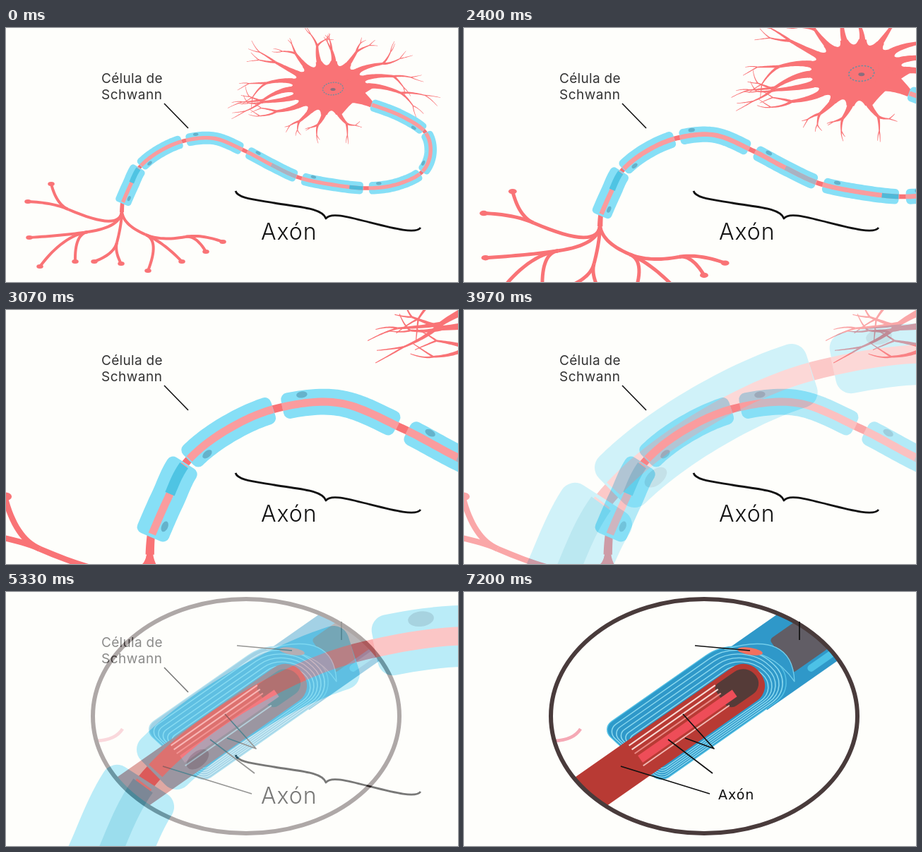
Recreate the animation shown at these times as an HTML page with a canvas. Size 640 by 360 pixels, loop 8 s.

```html
<!DOCTYPE html>
<html lang="es">
<head>
<meta charset="utf-8">
<style>
html, body { margin: 0; width: 100%; height: 100%; overflow: hidden; background: #fefefb; }
canvas { position: absolute; left: 0; top: 0; }
</style>
</head>
<body>
<script>
const PAPER = '#fefefb', RED = '#f97376', CYAN = '#86dff6', BLUE = '#2f98c9', INK = '#111';
const TAU = Math.PI * 2;
let g, seed;

function random() {
  seed = (seed * 16807) % 2147483647;
  return seed / 2147483647;
}

function layer(draw, opaque) {
  const canvas = document.body.appendChild(document.createElement('canvas'));
  canvas.width = 640;
  canvas.height = 360;
  g = canvas.getContext('2d');
  g.lineJoin = 'round';
  if (opaque) {
    g.fillStyle = PAPER;
    g.fillRect(0, 0, 640, 360);
  }
  draw();
  return canvas;
}

function stroke(path, color, width) {
  g.strokeStyle = color;
  g.lineWidth = width;
  g.stroke(typeof path === 'string' ? new Path2D(path) : path);
}

function oval(x, y, rx, ry, color, turn = 0) {
  g.fillStyle = color;
  g.beginPath();
  g.ellipse(x, y, rx, ry, turn, 0, TAU);
  g.fill();
}

function box(x0, y0, x1, y1, color, radius = 0) {
  g.fillStyle = color;
  g.beginPath();
  g.roundRect(x0, y0, x1 - x0, y1 - y0, radius);
  g.fill();
}

function text(str, x, y, font, color, spacing = 0) {
  g.font = font;
  g.letterSpacing = spacing + 'px';
  g.fillStyle = color;
  g.fillText(str, x, y);
}

// Point at a signed distance to the right of a curve's heading
function beside(curve, u, distance) {
  const [x0, y0] = curve(u - .01), [x1, y1] = curve(u + .01), [x, y] = curve(u);
  const len = Math.hypot(x1 - x0, y1 - y0) || 1;
  return [x - (y1 - y0) / len * distance, y + (x1 - x0) / len * distance];
}

// Fills a band along a curve, its width going from w0 to w1
function ribbon(curve, from, to, w0, w1, color, round = 0) {
  const steps = Math.ceil((to - from) * 16), left = [], right = [];
  for (let i = 0; i <= steps; i++) {
    const u = from + (to - from) * i / steps;
    const half = (w0 + (w1 - w0) * i / steps - round) / 2;
    left.push(beside(curve, u, -half));
    right.unshift(beside(curve, u, half));
  }
  const path = new Path2D('M' + left.concat(right).join('L') + 'Z');
  g.fillStyle = color;
  g.fill(path);
  if (round) stroke(path, color, round);
}

// A limb leaves along the heading it is given and returns the one it ends with
function limb(x, y, heading, ex, ey, w0, w1) {
  const reach = Math.hypot(ex - x, ey - y) * .42;
  const cx = x + Math.cos(heading) * reach, cy = y + Math.sin(heading) * reach;
  const mix = (a, b, c, u) => (1 - u) ** 2 * a + 2 * u * (1 - u) * b + u * u * c;
  ribbon(u => [mix(x, cx, ex, u), mix(y, cy, ey, u)], 0, 1, w0, w1, RED);
  return Math.atan2(ey - cy, ex - cx);
}

// Even knots are gaps between sheaths, odd knots are their middles
const knots = [
  [165, 248], [176, 223], [189.5, 197], [217, 175], [252, 160], [295, 156.5], [338, 174], [376, 194],
  [415, 212], [462, 222], [510, 227], [552, 222], [588, 205], [601, 177], [593, 147], [558, 124], [516, 108]
];

function axon(t) {
  const i = Math.max(0, Math.min(knots.length - 2, Math.floor(t))), u = t - i;
  const at = k => knots[Math.max(0, Math.min(knots.length - 1, k))];
  return [0, 1].map(axis => {
    const [a, b, c, d] = [-1, 0, 1, 2].map(k => at(i + k)[axis]);
    return b + u / 2 * (c - a + u * (2 * a - 5 * b + 4 * c - d + u * (3 * (b - c) + d - a)));
  });
}

function sheath(i) {
  const start = 2 * i + .14, end = 2 * i + 1.86;
  const width = 17.5 + 6 * Math.exp(-1.3 * i);
  ribbon(axon, start + .05, end - .05, width, width, CYAN, 9);
  const spot = 2 * i + .42, [x, y] = beside(axon, spot, i < 2 ? 6 : -6);
  const [x0, y0] = axon(spot - .1), [x1, y1] = axon(spot + .1);
  oval(x, y, 3.8, 2.2, '#65b2cb', Math.atan2(y1 - y0, x1 - x0));
  ribbon(axon, start - .06, end + .06, 5.4, 5.4, '#fa9c9e');
}

// Each node: x, y, then the nodes that branch from it
const terminals = [164, 258,
  [88, 257, [31, 246], [64, 221]],
  [116, 289, [33, 297], [48, 338], [98, 331]],
  [157, 304, [125, 331], [163, 334]],
  [198, 293, [201, 344], [249, 331], [254, 296, [283, 317], [307, 303]]]
];

function branch([x, y, ...nodes], heading) {
  if (!nodes.length) oval(x, y, 4.8, 3, RED);
  for (const node of nodes) branch(node, limb(x, y, heading, node[0], node[1], 4, 4));
}

function dendrite(x, y, heading, length, width, depth) {
  const bend = heading + (random() - .5) * .7;
  const ex = x + Math.cos(bend) * length, ey = y + Math.sin(bend) * length;
  const out = limb(x, y, heading, ex, ey, width, width * .4);
  if (!depth) return;
  for (const side of [-1, 1])
    dendrite(ex, ey, out + side * (.15 + random() * .45), length * (.5 + random() * .3), width * .4, depth - 1);
}

function soma() {
  const cx = 458, cy = 85, count = 15;
  const ring = (angle, k) => [cx + 52 * k * Math.cos(angle), cy + 32 * k * Math.sin(angle)];
  seed = 77;
  const angles = Array.from({ length: count }, (_, i) => 1.35 + i * 4.85 / (count - 1));
  for (const a of angles) {
    const [x, y] = ring(a, 1.05);
    const reach = Math.hypot(76 * Math.cos(a), 40 * Math.sin(a));
    dendrite(x, y, Math.atan2(y - cy, x - cx), reach * (.5 + random() * .14), 8, 2);
  }
  const body = angles.map((a, i) => {
    const next = angles[i + 1] ?? angles[0] + TAU;
    return `${i ? 'L' : 'M'}${ring(a - .07, 1.2)} L${ring(a + .07, 1.2)}
      Q${ring((a + next) / 2, .82)} ${ring(next - .07, 1.2)}`;
  });
  g.fillStyle = RED;
  g.fill(new Path2D(body.join(' ') + 'Z'));
  limb(480, 90, .2, 518, 109, 36, 8);

  g.setLineDash([2, 1.5]);
  const rim = new Path2D();
  rim.ellipse(463, 86, 14.5, 8.8, -.1, 0, TAU);
  stroke(rim, '#6b8fa0', 1.3);
  g.setLineDash([]);
  oval(463, 87, 3.6, 2, '#8a6f7d');
}

function neuron(scale, dx, dy) {
  g.setTransform(scale, 0, 0, scale, dx, dy);
  branch(terminals, Math.PI / 2);
  limb(165, 246, 1.7, 164, 261, 5.4, 6);
  soma();
  ribbon(axon, 0, 16, 5.4, 5.4, RED);
  for (let i = 0; i < 8; i++) sheath(i);
  ribbon(axon, 1.15, 1.9, 7, 7, '#4fc4e3');
  ribbon(axon, 7, 7.9, 5.4, 5.4, '#aab2c2');
  ribbon(axon, 9.5, 9.9, 5.4, 5.4, '#4fb9d8');
}

function captions() {
  const small = '19px Inter, "Open Sans", sans-serif';
  text('Célula de', 135, 78, small, '#333', .3);
  text('Schwann', 135, 101, small, '#333', .5);
  text('Axón', 361, 300, '300 32px Inter, "Open Sans", sans-serif', INK, 1);
  stroke('M224,107 L258,142', INK, 1.6);
  stroke(`M325,231 C328,241 350,243 380,248 C415,254 448,255 453,270
    C459,262 478,266 505,273 C545,283 580,293 587,283`, INK, 2.8);
}

// Drawn with the fibre lying along the x axis
function fibre() {
  box(190, -55, 420, 48, BLUE);
  box(250, -32, 420, 26, '#615d65', 5);
  box(270, 30, 345, 40, '#4cc1e6', 5);

  g.save();
  g.transform(1, 0, .22, 1, 0, 0);
  const turns = 6;
  for (let i = 0; i < turns; i++) {
    const k = i / (turns - 1);
    box(-3 + 14 * k, -65 + 33 * k, 240 - 27 * k, 46 - 14 * k, i ? BLUE : '#2d9aca',
      [18 - 8 * k, 62 - 30 * k, 46 - 16 * k, 14 - 5 * k]);
    g.strokeStyle = i ? '#8bd9ef' : '#55c0e4';
    g.lineWidth = 1.4;
    g.stroke();
  }
  g.restore();

  const collar = new Path2D('M190,-57 Q285,-25 245,37 Q246,-22 190,-57Z');
  g.fillStyle = BLUE;
  g.fill(collar);
  stroke(collar, '#72cdea', 1.3);

  box(-140, -30, 212, 29, '#b83a34', [0, 28, 26, 0]);
  box(146, -23, 205, 18, '#553b38', [8, 22, 18, 12]);
  box(3, -4, 166, 8, '#ee4d58');
  for (const [y, color] of [[-23, '#f7d9d4'], [-16, '#f7d9d4'], [-9, '#ea8a86'], [12, '#f0b9b4']])
    box(1, y - 1, 150, y + 1, color);
}

function lens() {
  const rim = new Path2D();
  rim.ellipse(340, 176, 217, 166, 0, 0, TAU);
  g.save();
  g.clip(rim);
  stroke('M128,211 Q155,210 165,194', '#f5a9b5', 4.5);
  g.translate(246, 237);
  g.rotate(-35 * Math.PI / 180);
  fibre();
  g.restore();
  oval(405, 84, 18, 5, '#f2705f', .15);
  stroke(rim, '#493b3b', 6);
  stroke(`M327,76 L405,83 M475,42 L475,68 M310,173 L354,222 L313,207
    M289,209 L352,257 M222,247 L348,286`, INK, 1.7);
}

layer(() => neuron(1, 0, 0), true);
const fades = [
  [layer(() => neuron(1.238, -10.4, -42), true), 1240, 540],
  [layer(() => neuron(2.055, -133.3, -189.7), true), 2400, 580],
  [layer(() => neuron(4.85, -715.6, -692.7), true), 3730, 640]
];
layer(captions);
fades.push(
  [layer(lens, true), 5000, 760],
  [layer(() => text('Axón', 360, 294, '19px "DejaVu Sans", sans-serif', INK, 1)), 6670, 510]
);

function frame(now) {
  const t = now % 8000;
  for (const [canvas, start, length] of fades)
    canvas.style.opacity = Math.min(1, Math.max(0, (t - start) / length));
  requestAnimationFrame(frame);
}
frame(performance.now());
</script>
</body>
</html>
```
